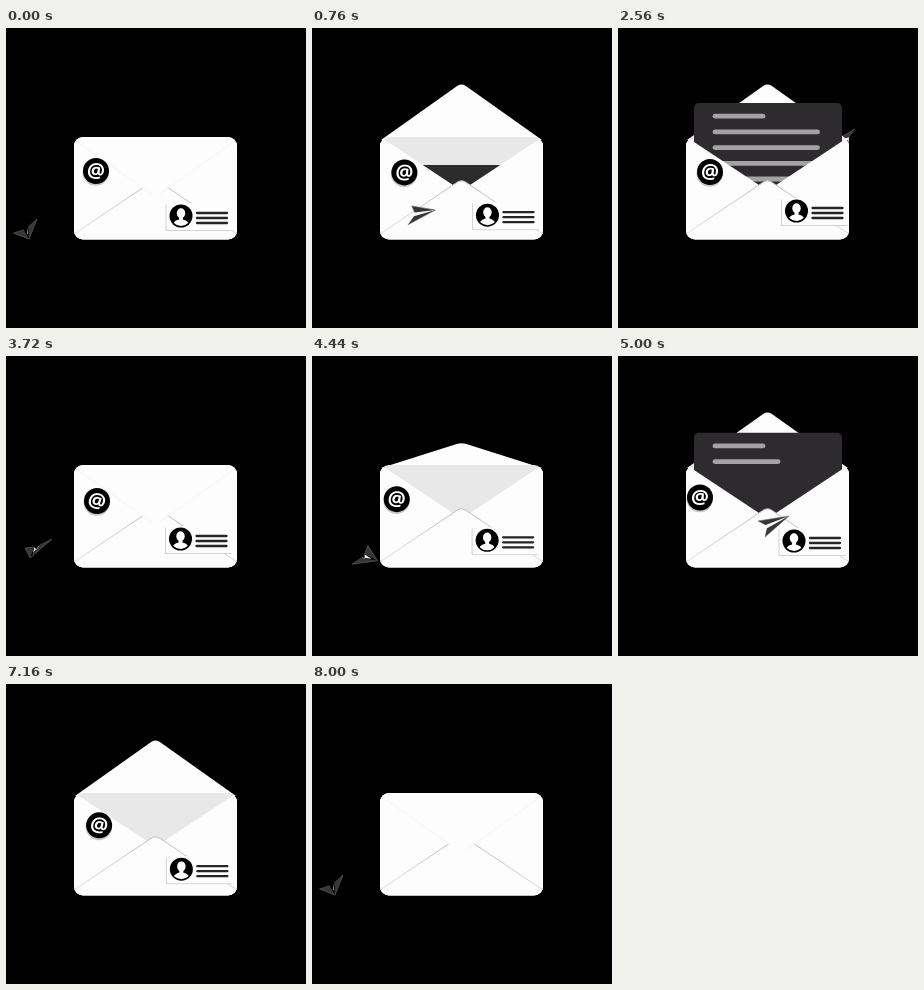
Animation, 300 px wide and 300 px high, one loop 8040 ms. Source, as an HTML page with a canvas:

```html
<!DOCTYPE html>
<html lang="en">
<head>
<meta charset="utf-8">
<title>Mail</title>
<style>
html, body { margin: 0; width: 100%; height: 100%; overflow: hidden; background: #000; }
canvas { display: block; width: 300px; height: 300px; }
</style>
</head>
<body>
<canvas id="stage" width="300" height="300"></canvas>
<script>
const ctx = document.getElementById('stage').getContext('2d');
const LOOP = 8040, STEP = 40, CYCLE = 4000;
const WHITE = '#fdfdfd', INK = '#2d2b2d';

// time, centre, then nose, port wing and starboard wing relative to it
const PLANE = [
  [0, 19.5, 201, 3.5, 10, 11.5, -10, -12, 4],
  [500, 62, 198, 12, 4, 0, -10, -14, 9],
  [1000, 155, 170, 16, -10, -15, -5, -8, 11],
  [1600, 250, 120, 9, -8, -15, 6, 14, 4],
  [1940, 271, 106, -3, -8, -14, 9, 14, -6],
  [2240, 264, 103, -13, 0, -7, 10, 13, -11],
  [2560, 230, 110, -14, 3, 0, 9, 7, -9],
  [3360, 69, 176, -13, 6, 10, 2, -2, -8],
  [3720, 32, 192, -8, 10, 14, -9, -13, 0]
];
// time, centre, tilt
const BADGE = [
  [0, 90, 143, 0.08], [1600, 95.5, 145.5, 0], [2560, 92, 144, 0.05],
  [3720, 91, 145, 0.28], [5000, 82, 141.5, 0], [6240, 95.5, 140, 0.22]
];
// time, centre of the portrait
const CARD = [
  [0, 175, 188], [1600, 176.5, 185], [2560, 178.5, 183],
  [3720, 174.5, 183], [5000, 176, 185], [6240, 176, 182]
];

const clamp = v => Math.min(1, Math.max(0, v));
const span = (t, a, b) => clamp((t - a) / (b - a));
const lerp = (a, b, k) => a + (b - a) * k;
const mix = (p, q, k) => [lerp(p[0], q[0], k), lerp(p[1], q[1], k)];
const inOut = u => u < 0.5 ? 4 * u ** 3 : 1 - 4 * (1 - u) ** 3;

// Smooth cyclic interpolation through keys
function follow(keys, period, t) {
  const n = keys.length;
  const at = i => {
    const turn = Math.floor(i / n), k = keys[i - turn * n];
    return [k[0] + turn * period, ...k.slice(1)];
  };
  let i = 0;
  while (i < n - 1 && keys[i + 1][0] <= t) i++;
  const [a, b, c, d] = [at(i - 1), at(i), at(i + 1), at(i + 2)];
  const h = c[0] - b[0], u = (t - b[0]) / h, u2 = u * u, u3 = u2 * u;
  return b.slice(1).map((v, j) => {
    const k = j + 1;
    const m0 = (c[k] - a[k]) / (c[0] - a[0]) * h;
    const m1 = (d[k] - b[k]) / (d[0] - b[0]) * h;
    return (2 * u3 - 3 * u2 + 1) * v + (u3 - 2 * u2 + u) * m0 +
      (3 * u2 - 2 * u3) * c[k] + (u3 - u2) * m1;
  });
}

function poly(color, ...pts) {
  ctx.fillStyle = color;
  ctx.beginPath();
  pts.forEach(p => ctx.lineTo(p[0], p[1]));
  ctx.closePath();
  ctx.fill();
}

function box(color, x, y, w, h, r) {
  ctx.fillStyle = color;
  ctx.beginPath();
  ctx.roundRect(x, y, w, h, r);
  ctx.fill();
}

function oval(color, x, y, rx, ry = rx) {
  ctx.fillStyle = color;
  ctx.beginPath();
  ctx.ellipse(x, y, rx, ry, 0, 0, Math.PI * 2);
  ctx.fill();
}

function stroke(x1, y1, x2, y2, width, color, cap = 'butt') {
  ctx.strokeStyle = color;
  ctx.lineWidth = width;
  ctx.lineCap = cap;
  ctx.beginPath();
  ctx.moveTo(x1, y1);
  ctx.lineTo(x2, y2);
  ctx.stroke();
}

function clipBody() {
  ctx.beginPath();
  ctx.roundRect(68, 109, 163, 102.5, 9);
  ctx.clip();
}

function drawFlap(s) {
  const tip = 112 - 55 * s, k = 0.05;
  const l = [69, 112], r = [230, 112], top = [149.5, tip - 2 * s];
  const a = mix(top, l, k), b = mix(top, r, k);
  ctx.fillStyle = WHITE;
  ctx.beginPath();
  ctx.moveTo(...l);
  ctx.lineTo(...a);
  ctx.quadraticCurveTo(...top, ...b);
  ctx.lineTo(...r);
  ctx.fill();
  if (s < 0) {
    stroke(...l, ...a, 0.8, '#f4f4f4');
    stroke(...r, ...b, 0.8, '#f4f4f4');
  }
}

function drawLetter(t) {
  const up = inOut(span(t, 500, 1100)) - inOut(span(t, 2740, 3300));
  if (up <= 0) return;
  const y = 75 + 92 * (1 - up);
  ctx.save();
  ctx.beginPath();
  ctx.rect(68, 40, 163, 165);
  ctx.clip();
  box(INK, 76, y, 148, 100, 5);
  for (let i = 0; i < 5; i++) {
    const start = i ? 790 + 130 * i : 810;
    const k = span(t, start, i ? start + 130 : 920);
    const ly = y + 13.2 + 15.7 * i;
    if (k > 0) stroke(97, ly, lerp(97, i ? 199.5 : 145, k), ly, 4.8, '#a5a2a5', 'round');
  }
  ctx.restore();
}

function drawPocket() {
  ctx.save();
  clipBody();
  poly(WHITE, [68, 108.7], [150, 163], [68, 212]);
  poly(WHITE, [231, 108.7], [149, 163], [231, 212]);
  ctx.fillStyle = WHITE;
  ctx.beginPath();
  ctx.moveTo(68, 206);
  ctx.lineTo(144, 155);
  ctx.quadraticCurveTo(149.5, 150.5, 155, 155);
  ctx.lineTo(231, 206);
  ctx.lineTo(231, 212);
  ctx.lineTo(68, 212);
  ctx.fill();
  const shade = ctx.createLinearGradient(68, 0, 231, 0);
  shade.addColorStop(0, '#e2e2e2');
  shade.addColorStop(0.44, '#bdbdbd');
  shade.addColorStop(0.56, '#bdbdbd');
  shade.addColorStop(1, '#d8d8d8');
  ctx.strokeStyle = shade;
  ctx.lineWidth = 1;
  ctx.beginPath();
  ctx.moveTo(68, 206);
  ctx.lineTo(144, 155);
  ctx.quadraticCurveTo(149.5, 150.5, 155, 155);
  ctx.lineTo(231, 206);
  ctx.stroke();
  ctx.restore();
}

function drawBadge(t) {
  const [x, y, tilt] = follow(BADGE, CYCLE * 2, t);
  oval('#c9c9c9', x - 0.3, y + 1.6, 13.2);
  oval('#000', x, y, 13);
  ctx.save();
  ctx.translate(x, y);
  ctx.rotate(tilt);
  ctx.font = 'bold 20px "Open Sans", "Liberation Sans", sans-serif';
  ctx.fillStyle = '#fff';
  const m = ctx.measureText('@');
  ctx.fillText('@', (m.actualBoundingBoxLeft - m.actualBoundingBoxRight) / 2,
    (m.actualBoundingBoxAscent - m.actualBoundingBoxDescent) / 2);
  ctx.restore();
}

function drawCard(t) {
  const [x, y] = follow(CARD, CYCLE * 2, t);
  ctx.save();
  clipBody();
  box('#d2d2d2', x - 15.5, y - 12, 67, 27, 1.5);
  box(WHITE, x - 14.5, y - 13, 67, 27, 1.5);
  ctx.restore();
  oval('#000', x, y, 11.5);
  ctx.save();
  ctx.beginPath();
  ctx.arc(x, y, 10, 0, Math.PI * 2);
  ctx.clip();
  oval('#fff', x, y - 2.8, 4.2, 5);
  ctx.fillRect(x - 2, y, 4, 5);
  oval('#fff', x, y + 8, 7.6, 4.6);
  ctx.restore();
  for (const dy of [-3, 2, 7]) stroke(x + 16, y + dy, x + 46, y + dy, 2.3, '#262426', 'round');
}

function drawPlane(t) {
  const [x, y, ...o] = follow(PLANE, CYCLE, t);
  const [nose, port, star] = [0, 2, 4].map(i => [x + o[i], y + o[i + 1]]);
  const tail = mix(mix(port, star, 0.5), nose, 0.22);
  const keel = [tail[0] + 1, tail[1] + 5];
  poly('#f4f4f4', mix(tail, nose, 0.55), mix(tail, port, 0.18), keel, mix(tail, star, 0.18));
  for (const wing of [port, star]) {
    const inner = mix(tail, wing, 0.2);
    poly('#373537', nose, wing, inner);
    stroke(...nose, ...wing, 0.6, '#6c6a6c');
    stroke(...wing, ...inner, 0.5, '#6c6a6c');
  }
}

function draw(time) {
  const t = time % CYCLE;
  const open = 1 - (1 - span(t, 260, 640)) ** 2 - span(t, 3320, 3720) ** 2;
  const s = 2 * open - 1;
  ctx.fillStyle = '#000';
  ctx.fillRect(0, 0, 300, 300);
  if (t >= 1940) drawPlane(t);
  if (s > 0) drawFlap(s);
  box(open > 0 ? '#e8e8e8' : WHITE, 68, 109, 163, 102.5, 9);
  drawLetter(t);
  drawPocket();
  if (s <= 0) {
    ctx.save();
    clipBody();
    box(WHITE, 68, 109, 163, 4, 0);
    drawFlap(s);
    ctx.restore();
  }
  // Badge and card drop out for the last step of the loop
  if (time < CYCLE * 2) {
    drawBadge(time);
    drawCard(time);
  }
  if (t < 1940) drawPlane(t);
}

const begin = performance.now();
function tick() {
  const time = (performance.now() - begin) % LOOP;
  draw(Math.floor(time / STEP) * STEP);
  requestAnimationFrame(tick);
}
tick();
</script>
</body>
</html>
```
